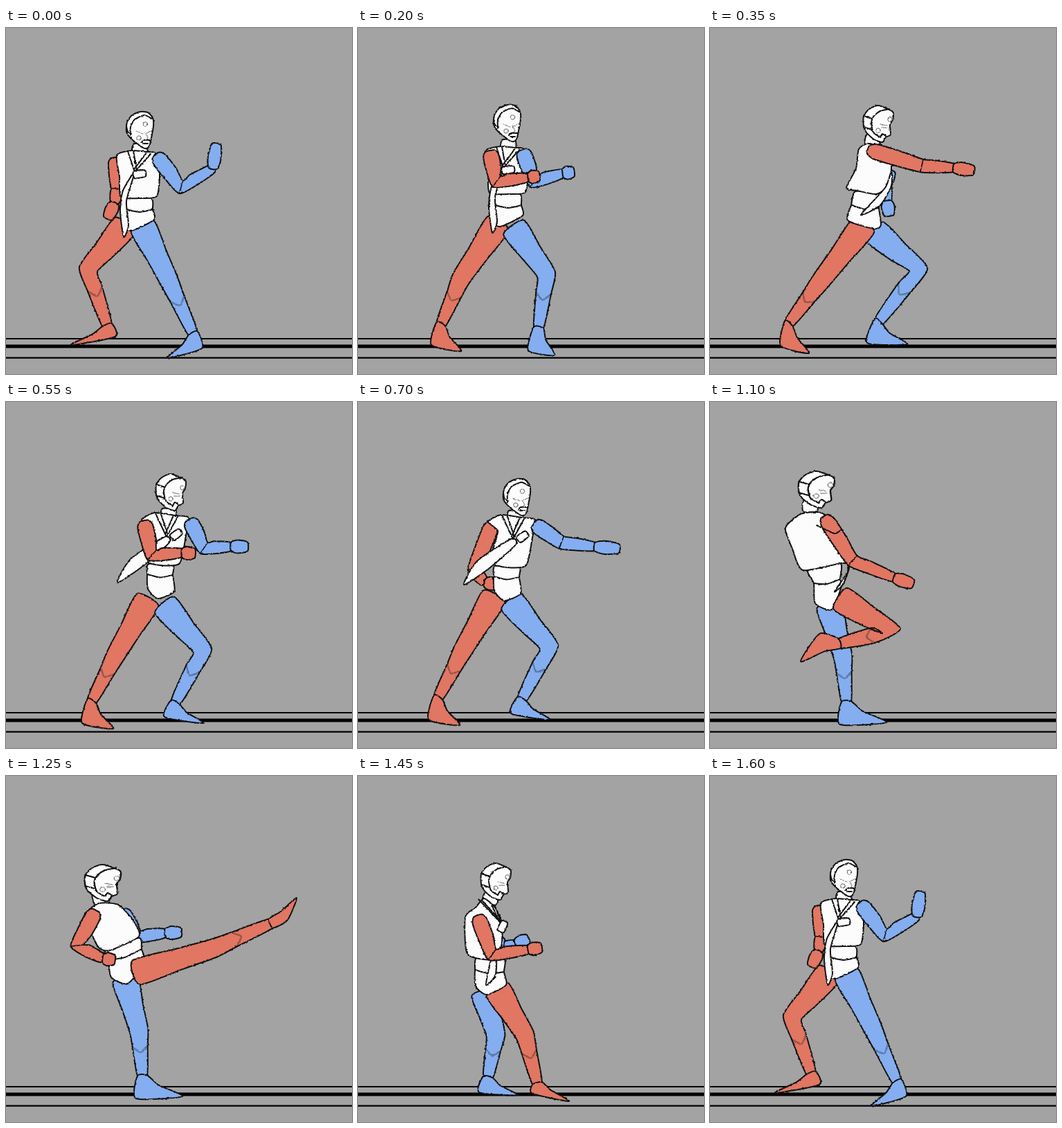
Write an HTML page that moves like this. It is 500 px wide and 500 px high and loops after 2.4 s.

```html
<!DOCTYPE html>
<html lang="en">
<head>
<meta charset="utf-8">
<title>Fighter</title>
<style>
html, body { margin: 0; width: 100%; height: 100%; overflow: hidden; background: #a3a3a3; }
svg { display: block; width: 100%; height: 100%; }
path, circle { stroke-linecap: round; stroke-linejoin: round; }
</style>
</head>
<body>
<svg viewBox="0 0 500 500">
  <filter id="rough" filterUnits="userSpaceOnUse" x="0" y="0" width="500" height="500" color-interpolation-filters="sRGB">
    <feTurbulence type="fractalNoise" baseFrequency=".3" numOctaves="2" seed="4"/>
    <feDisplacementMap in="SourceGraphic" scale="2.6" xChannelSelector="R" yChannelSelector="G"/>
  </filter>
  <rect width="500" height="500" fill="#a3a3a3"/>
  <path d="M0 449H500M0 476.7H500" stroke="#000" stroke-width="2.2"/>
  <path d="M0 460H500" stroke="#000" stroke-width="5"/>
  <g id="fighter" filter="url(#rough)"></g>
</svg>
<script>
const RED = '#e17663', BLUE = '#84aef0', WHITE = '#fcfcfc', INK = '#111', GREY = '#666';

const points = s => s.match(/\S+ \S+/g).map(p => p.split(' ').map(Number));
const mix = (a, b, t) => [a[0] + (b[0] - a[0]) * t, a[1] + (b[1] - a[1]) * t];
const add = (p, v, k) => [p[0] + v[0] * k, p[1] + v[1] * k];
const normal = (a, b) => {
  const x = b[0] - a[0], y = b[1] - a[1], d = Math.hypot(x, y) || 1;
  return [-y / d, x / d];
};

// Slightly rounded curve through the points.
function curve(p, closed) {
  const n = p.length, at = i => closed ? p[(i + n) % n] : p[Math.max(0, Math.min(n - 1, i))];
  let d = 'M' + p[0];
  for (let i = 0; i < (closed ? n : n - 1); i++) {
    const a = at(i - 1), b = at(i), c = at(i + 1), e = at(i + 2);
    d += `C${add(b, mix([0, 0], [c[0] - a[0], c[1] - a[1]], 1 / 9), 1)} ` +
         `${add(c, mix([0, 0], [b[0] - e[0], b[1] - e[1]], 1 / 9), 1)} ${c}`;
  }
  return d + (closed ? 'Z' : '');
}
const shape = (fill, p) => `<path d="${curve(p, true)}" fill="${fill}" stroke="${INK}" stroke-width="2"/>`;
const stroke = (p, color = INK, width = 2, alpha = 1) =>
  `<path d="${curve(p)}" fill="none" stroke="${color}" stroke-width="${width}" stroke-opacity="${alpha}"/>`;
const patch = s => shape(WHITE, points(s));
const line = s => stroke(points(s));
const fine = s => stroke(points(s), GREY, 1);
const ring = (x, y) => `<circle cx="${x}" cy="${y}" r="3.2" fill="none" stroke="${GREY}"/>`;
const shift = (x, y, parts, sx = 1) =>
  `<g transform="translate(${x} ${y}) scale(${sx} 1)">${parts.join('')}</g>`;

// Both edges of a band with the given half widths along a spine.
function edges(spine, widths) {
  const last = spine.length - 1;
  const n = spine.map((p, i) => normal(spine[Math.max(0, i - 1)], spine[Math.min(last, i + 1)]));
  return [1, -1].map(side => spine.map((p, i) => add(p, n[i], side * widths[i])));
}
const band = (fill, [l, r]) => shape(fill, [...l, ...r.slice().reverse()]);

// hip, knee, ankle, heel, toe
function leg(fill, s) {
  const [hip, knee, ankle, heel, toe] = points(s);
  const spine = [hip, mix(hip, knee, .55), knee, mix(knee, ankle, .35), ankle];
  const [l, r] = edges(spine, [18, 15.5, 13.5, 11, 7]);
  let u = normal(knee, ankle);
  if (u[0] * (toe[0] - heel[0]) + u[1] * (toe[1] - heel[1]) < 0) u = [-u[0], -u[1]];
  const front = add(ankle, u, 7), instep = mix(mix(front, toe, .4), heel, .1);
  return band(fill, [l, r]) +
    stroke([l[3], mix(spine[3], ankle, .2), r[3]], INK, 2.6, .32) +
    shape(fill, [add(ankle, u, -7), heel, toe, instep, front]);
}

// shoulder, elbow, wrist, fingertips
function arm(fill, s) {
  const [shoulder, elbow, wrist, tip] = points(s);
  const spine = [mix(shoulder, elbow, -.17), shoulder, mix(shoulder, elbow, .5), elbow, mix(elbow, wrist, .4), wrist];
  const [l, r] = edges(spine, [6, 11, 11, 9.5, 9, 6]);
  return band(fill, [l, r]) + stroke([l[3], r[3]], INK, 1.5) +
    band(fill, edges([wrist, mix(wrist, tip, .4), tip], [6, 9.5, 6.5]));
}

// The belt crosses the hips from the third point to the last.
function hips(s) {
  const p = points(s);
  return shape(WHITE, p) + stroke([p[2], add(mix(p[2], p[6], .5), [0, 1], 4), p[6]]);
}
const neck = s => band(WHITE, edges(points(s), [9, 10]));
function lapels(s) {
  const [a, b, knot] = points(s);
  return stroke([a, knot]) + stroke([b, knot]) +
    stroke([mix(a, b, .25), mix(knot, b, .12)]) + stroke([mix(b, a, .2), mix(knot, a, .12)]);
}
const pocket = s => band(WHITE, edges(points(s), [5, 4.5]));

const frontHead = [
  patch('174 150 175 136 182 126 194 121 205 122 212 130 213 142 208 168 203 174 196 172 181 160'),
  line('180 155 180 143 186 132 200 126 211 131'), line('174 142 176 150 181 153'),
  ring(201.5, 139), ring(192, 159), fine('188 149 198 153'), fine('203 152 211 148'),
  fine('201 152 205 159 201 161'), line('196 165 199 162 209 162'), line('198 167 205 167')
];
const sideHead = [
  patch('222 142 222 128 229 118 243 112 264 121 264 133 260 140 261 154 254 158 249 165 237 161 226 151'),
  line('259 117 246 120 237 127 233 137 236 151 246 158'), line('222 127 234 131'), line('222 143 234 147'),
  ring(260, 132), ring(243, 148), fine('246 139 255 141'), fine('248 144 256 144'), line('246 158 249 153 254 156')
];

const guardBody = [
  hips('174 245 210 246 212 262 214 277 180 293 166 276 174 262'),
  neck('194 168 193 180'),
  patch('182 177 160 184 164 215 166 244 196 246 218 243 222 210 216 181 203 179'),
  lapels('176 178 209 182 186 208'),
  patch('186 208 169 235 165 265 170 302 177 285 174 250'),
  pocket('185 212 201 210')
];
const palmBody = [
  hips('198 237 233 238 233 253 235 277 211 287 197 273 196 252'),
  neck('227 157 227 167'),
  patch('207 163 188 173 202 186 197 206 192 232 215 239 243 236 252 196 256 170 237 167'),
  lapels('208 164 240 169 224 198'),
  patch('221 198 172 230 153 264 190 240 228 206'),
  pocket('232 199 244 190')
];
const palmLegs = [
  leg(RED, '197 281 151 360 116 427 102 459 147 467'),
  leg(BLUE, '221 288 276 354 237 429 221 450 277 459')
];
const standLeg = leg(BLUE, '172 293 192 368 197 433 188 466 255 463');

const guard = [
  arm(RED, '159 194 161 232 157 253 147 275'),
  leg(RED, '172 285 119 349 146 429 158 446 94 458'),
  leg(BLUE, '197 286 235 364 270 441 283 463 233 477'),
  ...guardBody,
  arm(BLUE, '222 190 253 230 299 203 304 168'),
  shift(0, 0, frontHead)
];
const windUp = [
  leg(RED, '203 282 149 362 120 428 106 458 149 467'),
  leg(BLUE, '225 288 272 356 261 433 246 466 284 473'),
  shift(24, -6, guardBody),
  arm(BLUE, '240 183 254 222 296 210 312 208'),
  arm(RED, '192 184 200 222 246 216 262 214'),
  shift(22, -10, frontHead)
];
const punch = [
  arm(BLUE, '257 208 253 228 256 250 259 271'),
  leg(BLUE, '238 294 301 349 244 424 227 455 285 457'),
  leg(RED, '223 284 159 367 114 427 102 459 143 470'),
  hips('210 236 244 240 244 260 247 285 236 290 199 278 204 256'),
  neck('236 155 234 169'),
  patch('230 167 215 175 211 203 197 231 212 235 240 240 255 230 262 205 258 178'),
  patch('262 207 253 231 218 270 246 256 262 228'),
  arm(RED, '240 179 306 199 352 202 381 206'),
  shift(0, 0, sideHead)
];
const swap = [
  shift(8, 5, palmLegs),
  shift(8, -3, palmBody),
  arm(BLUE, '268 176 286 211 325 209 349 209'),
  arm(RED, '201 179 211 221 254 218 273 219'),
  shift(-5, -8, sideHead)
];
const palm = [
  ...palmLegs,
  arm(RED, '191 184 168 243 183 261 202 264'),
  ...palmBody,
  arm(BLUE, '260 180 294 203 342 209 377 212'),
  shift(36, -10, frontHead)
];
const ready = [
  leg(RED, '181 282 149 345 147 427 157 443 106 455'),
  leg(BLUE, '210 282 240 365 249 434 260 467 228 468'),
  hips('177 235 219 233 219 252 222 272 197 289 184 273 178 251'),
  neck('201 152 202 168'),
  patch('184 166 164 172 178 182 175 208 171 233 192 236 224 230 228 198 234 171 212 168'),
  lapels('184 166 218 170 204 197'),
  patch('201 200 192 235 183 276 189 272 202 232 206 203'),
  pocket('208 199 220 191'),
  arm(RED, '168 182 155 242 162 264 180 267'),
  arm(BLUE, '234 182 246 223 258 234 283 234'),
  shift(-40, -2, sideHead)
];
const chamber = [
  standLeg,
  hips('142 243 188 233 188 256 190 266 176 300 152 291 150 262'),
  neck('144 142 145 158'),
  patch('131 162 109 182 119 212 134 243 188 233 198 230 186 180 160 160'),
  patch('197 228 199 245 180 274 192 264 201 240'),
  leg(RED, '188 284 262 331 187 349 158 335 131 375'),
  arm(RED, '171 175 206 229 266 254 293 263'),
  line('154 178 180 190 189 185'),
  shift(-138, -12, sideHead, 1.2)
];
const kick = [
  standLeg,
  arm(BLUE, '170 200 190 232 230 227 253 226'),
  hips('144 252 192 234 196 250 200 270 176 300 152 291 148 266'),
  neck('133 168 140 186'),
  patch('134 184 114 200 122 224 134 248 150 252 192 232 184 209 162 186'),
  leg(RED, '188 284 300 249 383 213 407 208 420 176'),
  arm(RED, '126 202 103 245 140 264 157 266'),
  shift(-152, 16, sideHead, 1.2)
];
const land = [
  leg(BLUE, '182 312 199 375 188 435 175 457 230 461'),
  leg(RED, '201 308 241 374 259 444 252 459 305 470'),
  arm(BLUE, '200 240 210 249 228 243 246 235'),
  hips('172 262 211 264 211 283 214 302 186 316 170 304 169 280'),
  neck('193 170 190 184'),
  patch('182 177 170 190 155 204 158 257 192 265 207 246 208 212 198 190'),
  lapels('174 178 198 188 207 213'),
  pocket('206 224 212 211'),
  patch('192 267 185 302 198 289 200 268'),
  arm(RED, '176 210 194 258 246 251 265 248'),
  shift(-44, 14, sideHead)
];

const beats = [
  [200, guard], [150, windUp], [200, punch], [150, swap], [200, palm],
  [200, ready], [150, chamber], [200, kick], [150, land], [800, guard]
];
const loop = beats.reduce((sum, [ms]) => sum + ms, 0);
const fighter = document.getElementById('fighter');
let shown;

function show(time) {
  let t = time % loop, i = 0;
  while (t >= beats[i][0]) t -= beats[i++][0];
  const pose = beats[i][1];
  if (pose !== shown) fighter.innerHTML = pose.join('');
  shown = pose;
}

const start = performance.now();
function tick() {
  show(performance.now() - start);
  requestAnimationFrame(tick);
}
tick();
</script>
</body>
</html>
```
